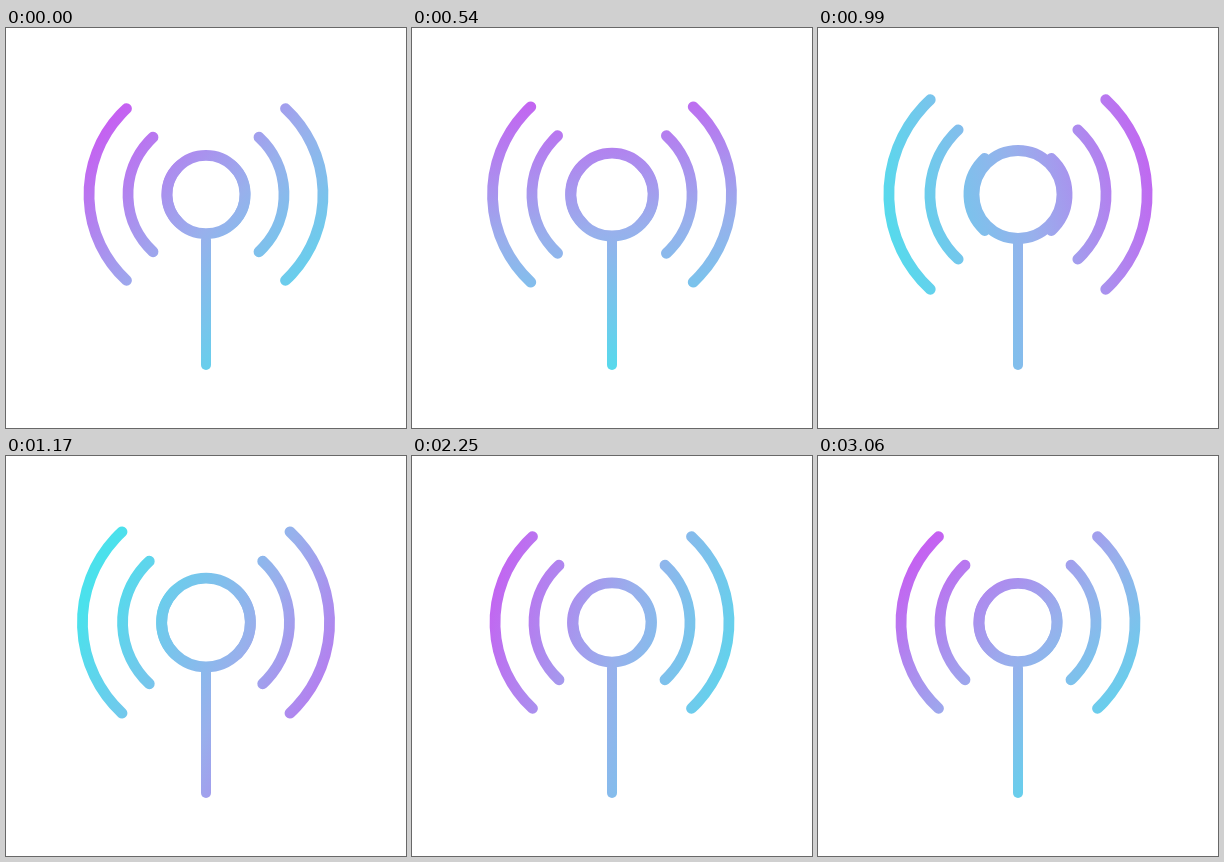
Animation of 400x400 px, one loop 8000 ms. Source, as an HTML page with a canvas:

```html
<!DOCTYPE html>
<html>
<head>
<meta charset="utf-8">
<title>Signal</title>
<style>
  html, body { margin: 0; width: 100%; height: 100%; overflow: hidden; background: #fff; }
  canvas { display: block; width: 100vw; height: 100vh; }
</style>
</head>
<body>
<canvas id="stage" width="400" height="400"></canvas>
<script>
const ctx = document.getElementById('stage').getContext('2d');
const LOOP = 8000;
const TURN = 2950;
const CX = 200, CY = 166.5;
const SPREAD = 47.2 * Math.PI / 180;

// Waves: speed up, cruise, then settle after six steps outward.
const STEPS = 6, SPEED = 0.0049, RAMP = 244, SETTLE = 1170;
const LAST_PHASE = 2.96;

const clamp = v => Math.min(1, Math.max(0, v));
const smooth = v => { v = clamp(v); return v * v * (3 - 2 * v); };

function bezierEase(u, x1, x2) {
  let lo = 0, hi = 1;
  for (let i = 0; i < 24; i++) {
    const s = (lo + hi) / 2, r = 1 - s;
    if (3 * s * r * r * x1 + 3 * s * s * r * x2 + s * s * s < u) lo = s; else hi = s;
  }
  return smooth(lo);
}

function waveTravel(t) {
  if (t < RAMP) return SPEED * t * t / (2 * RAMP);
  const cruise = time => SPEED * (time - RAMP / 2);
  if (t < SETTLE) return cruise(t);
  const rest = STEPS - cruise(SETTLE);
  const length = 4 * rest / SPEED;
  return STEPS - rest * (1 - clamp((t - SETTLE) / length)) ** 4;
}

const waveRadius = phase => 39 + 39 * phase + 8 * Math.max(0, phase - 2);

// The gradient turns once, its middle drifting away and back.
function gradientAt(t) {
  const turn = 2 * Math.PI * bezierEase(clamp(t / TURN), 0.33, 0.48);
  const angle = turn - Math.PI * 3 / 4;
  const mid = 200 + 12 * (1 - Math.cos(turn));
  const dx = 163 * Math.cos(angle), dy = 163 * Math.sin(angle);
  const g = ctx.createLinearGradient(mid + dx, mid + dy, mid - dx, mid - dy);
  g.addColorStop(0, '#cb56f2');
  g.addColorStop(0.5, '#98b0ec');
  g.addColorStop(1, '#4be1ec');
  return g;
}

function arc(r, from, to) {
  ctx.beginPath();
  ctx.arc(CX, CY, r, from, to);
  ctx.stroke();
}

function fitStage() {
  const ratio = devicePixelRatio || 1;
  const w = Math.round(innerWidth * ratio), h = Math.round(innerHeight * ratio);
  if (ctx.canvas.width !== w || ctx.canvas.height !== h) {
    ctx.canvas.width = w;
    ctx.canvas.height = h;
  }
  const scale = Math.min(w, h) / 400;
  ctx.setTransform(scale, 0, 0, scale, 0, 0);
  ctx.clearRect(0, 0, w / scale, h / scale);
}

function draw(t) {
  fitStage();
  ctx.strokeStyle = gradientAt(t);
  ctx.lineCap = 'round';
  ctx.lineWidth = 10.8;

  const first = waveTravel(t) % 1;
  for (let phase = first; phase < LAST_PHASE; phase++) {
    const r = waveRadius(phase);
    arc(r, -SPREAD, SPREAD);
    arc(r, Math.PI - SPREAD, Math.PI + SPREAD);
  }

  const swell = smooth(t / 1170) - smooth((t - 1440) / 960);
  arc(39.2 + 5.1 * swell, 0, Math.PI * 2);

  ctx.lineWidth = 10;
  ctx.beginPath();
  ctx.moveTo(CX, 212);
  ctx.lineTo(CX, 337);
  ctx.stroke();
}

const start = performance.now();
function tick() {
  draw((performance.now() - start) % LOOP);
  requestAnimationFrame(tick);
}
tick();
</script>
</body>
</html>
```
